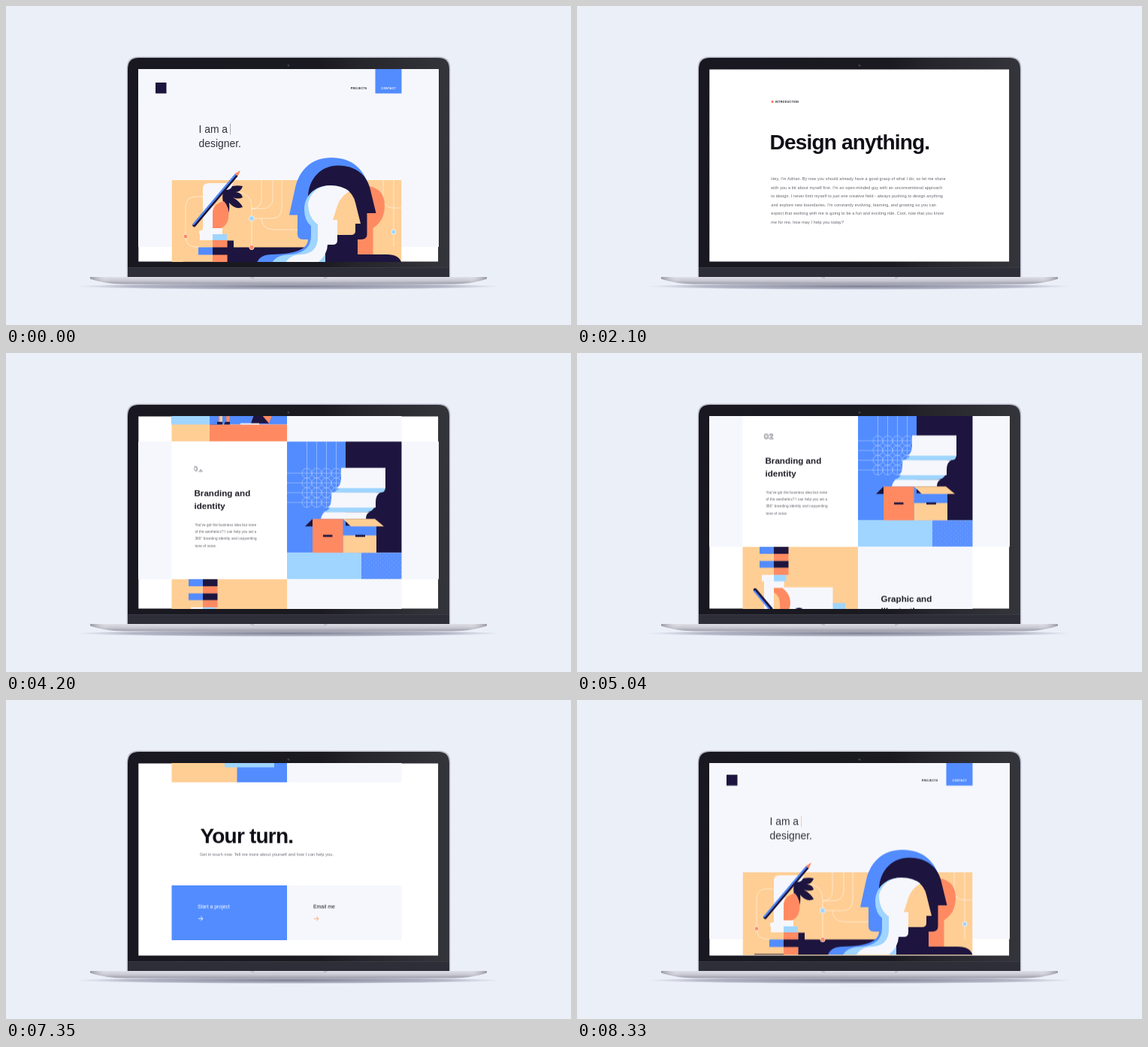
Animation of 752x425 px, one loop 8.4 s. Source, as an HTML page:

```html
<!DOCTYPE html>
<html lang="en">
<head>
<meta charset="utf-8">
<title>Portfolio on a laptop</title>
<style>
  html, body { margin: 0; width: 100%; height: 100%; overflow: hidden; background: #ebeff8; }
  svg { display: block; width: 100vw; height: 100vh; }
  text { font-family: "Liberation Sans", Arial, sans-serif; fill: #1d1c26; white-space: pre; }

  .blue { fill: #528cff } .navy { fill: #1d153f } .sky { fill: #9fd5ff }
  .coral { fill: #ff8a62 } .sand { fill: #ffce94 } .pale { fill: #f6f7fc }
  .line { fill: none; stroke: #fff; stroke-width: .7; opacity: .75 }

  .big { font-size: 28px; font-weight: 700; letter-spacing: -.8px; fill: #0f0f17 }
  .head { font-size: 11.6px; font-weight: 700 }
  .body { font-size: 5.4px; letter-spacing: .15px; fill: #62626c }
  .small { font-size: 4.65px; letter-spacing: .1px; fill: #62626c }
  .caps { font-size: 3.6px; font-weight: 700; letter-spacing: .31px }
  .hero { font-size: 13.9px; fill: #33323e }
  .link { font-size: 6.9px }
  .num { font: 700 9.6px Inter, sans-serif; letter-spacing: .2px; fill: none; stroke: #8d8d95; stroke-width: .75;
         stroke-dasharray: 34; animation: 8.4s linear infinite }

  #page { animation: scroll 8.4s cubic-bezier(.65,0,.35,1) infinite }
  @keyframes scroll {
    0%, 11.79% { transform: translateY(0) }
    22.5%, 27.74% { transform: translateY(-300px) }
    37.5%, 41.07% { transform: translateY(-540px) }
    50%, 55.95% { transform: translateY(-728.3px) }
    66.43%, 70.83% { transform: translateY(-916.6px) }
    81.55% { transform: translateY(-1103.4px) }
    87.5% { transform: translateY(-1103.4px); animation-timing-function: cubic-bezier(.6,0,.17,1) }
    100% { transform: translateY(0) }
  }
  #cursor { animation: blink 1.05s step-end infinite }
  @keyframes blink { 0% { stroke: #9a9aa4 } 45%, 100% { stroke: #ffbd82 } }
  .dot { transform-box: fill-box; transform-origin: center; stroke: #fff; stroke-width: .7;
         animation: pulse 1.05s ease-in-out infinite }
  @keyframes pulse { 50% { transform: scale(.75) } }

  #n1 { animation-name: draw1 } #n2 { animation-name: draw2 } #n3 { animation-name: draw3 }
  @keyframes draw1 { 0%, 34.5% { stroke-dashoffset: 34 } 44%, 100% { stroke-dashoffset: 0 } }
  @keyframes draw2 { 0%, 47% { stroke-dashoffset: 34 } 56%, 100% { stroke-dashoffset: 0 } }
  @keyframes draw3 { 0%, 62% { stroke-dashoffset: 34 } 70%, 100% { stroke-dashoffset: 0 } }

  #title { animation: title 8.4s linear infinite }
  @keyframes title { 0%, 77% { opacity: 0 } 82%, 100% { opacity: 1 } }
  #start { transform-origin: 0 247px; animation: unfold 8.4s linear infinite }
  @keyframes unfold { 0%, 83.1% { transform: scaleY(0) } 87.5%, 100% { transform: none } }
  #links { animation: links 8.4s ease-out infinite }
  @keyframes links {
    0%, 82% { opacity: 0; transform: translateY(10px) }
    86.5%, 100% { opacity: 1; transform: none }
  }
</style>
</head>
<body>
<svg viewBox="0 0 752 425" preserveAspectRatio="none">
  <defs>
    <clipPath id="screen"><rect x="176.3" y="84.4" width="398.8" height="256"/></clipPath>
    <clipPath id="art"><rect x="220.5" y="190" width="306" height="152"/></clipPath>
    <linearGradient id="bezel">
      <stop offset="0" stop-color="#191821"/><stop offset=".6" stop-color="#1a1a20"/>
      <stop offset=".72" stop-color="#25252b"/><stop offset="1" stop-color="#34343b"/>
    </linearGradient>
    <linearGradient id="base" x2="0" y2="1">
      <stop offset="0" stop-color="#dedee7"/><stop offset=".5" stop-color="#c9c9d3"/>
      <stop offset="1" stop-color="#9c9ca9"/>
    </linearGradient>
    <linearGradient id="edge">
      <stop offset="0" stop-color="#77778a" stop-opacity=".7"/><stop offset=".05" stop-color="#fff" stop-opacity="0"/>
      <stop offset=".95" stop-color="#fff" stop-opacity="0"/><stop offset="1" stop-color="#77778a" stop-opacity=".7"/>
    </linearGradient>
    <radialGradient id="shade">
      <stop offset="0" stop-color="#5b5d70" stop-opacity=".75"/><stop offset=".75" stop-color="#70728a" stop-opacity=".45"/>
      <stop offset="1" stop-color="#8a8ca0" stop-opacity="0"/>
    </radialGradient>
    <pattern id="stripes" width="6" height="6.2" y="197" patternUnits="userSpaceOnUse">
      <rect width="6" height="6.2" fill="#ffb184"/><rect width="6" height="3.1" fill="#1a1142"/>
    </pattern>
    <pattern id="specks" x="473" y="266" width="6" height="6" patternUnits="userSpaceOnUse">
      <rect width="6" height="6" fill="#5a90ff"/><circle cx="1.5" cy="1.5" r=".45" fill="#9fc6ff"/>
      <circle cx="4.5" cy="4.5" r=".45" fill="#9fc6ff"/>
    </pattern>
    <path id="arrow" d="M0 0H6M3.2-2.8 6 0 3.2 2.8" fill="none" stroke-width=".9"/>
    <path id="foot" d="M112 361H640V363.5Q622 370 594 370.6H158Q130 370 112 363.5Z"/>
  </defs>

  <rect width="752" height="425" fill="#ebeff8"/>

  <!-- laptop -->
  <ellipse cx="376" cy="373.5" rx="284" ry="4.6" fill="url(#shade)"/>
  <path d="M160.7 361V83Q160.7 67.6 176 67.6H576Q591.4 67.6 591.4 83V361Z" fill="#bdbecb"/>
  <path d="M162 361V84Q162 69 177 69H575Q590 69 590 84V361Z" fill="url(#bezel)"/>
  <rect x="162" y="348.5" width="428" height="12.5" fill="#2e2e38"/>
  <rect x="162" y="348.2" width="428" height=".8" fill="#3e3e49"/>
  <circle cx="376" cy="79.3" r="1.7" fill="#30313b"/><circle cx="376" cy="79.3" r=".7" fill="#4c5068"/>
  <use href="#foot" fill="url(#base)"/>
  <use href="#foot" fill="url(#edge)"/>
  <path d="M325 361H428Q427 364 423 364H330Q326 364 325 361Z" fill="#c3c3cf"/>
  <rect x="330" y="361" width="93" height="2.2" fill="#dcdce5"/>

  <g clip-path="url(#screen)">
    <rect x="176" y="84" width="400" height="257" fill="#fff"/>
    <g id="page">
      <!-- hero -->
      <g>
        <rect class="pale" x="176" y="60" width="400" height="261"/>
        <rect class="blue" x="491.5" y="60" width="35" height="56.5"/>
        <rect class="navy" x="199" y="102" width="14.5" height="14.5"/>
        <text class="caps" x="458.7" y="110.8">PROJECTS</text>
        <text class="caps" x="499.6" y="110.8" style="fill:#fff">CONTACT</text>
        <text class="hero" x="256.5" y="168.7">I am a</text>
        <text class="hero" x="256.5" y="187.7">designer.</text>
        <path id="cursor" d="M298.6 157V171.5" stroke-width=".8"/>

        <g clip-path="url(#art)">
          <rect class="sand" x="220.5" y="232" width="306" height="110"/>
          <path class="line" d="M239 307V268Q239 254 253 254H264M239 307Q239 321 253 321H258
            M308 247Q327 250 327 268V321M340 232V256Q340 270 327 270M327 283H353Q367 283 367 269V232
            M355 232V256Q355 270 341 270H327M340 283Q341 298 356 298H390M502 232V255Q502 269 516 269H527
            M516 232V301M516 301V321"/>
          <circle class="dot coral" cx="239" cy="307" r="2.9"/>
          <circle class="dot sky" cx="327" cy="283" r="3.4"/>
          <circle class="dot sky" cx="516" cy="301" r="3.1"/>

          <!-- raised hand -->
          <path class="navy" d="M289 262Q286 247 294 242Q304 238 315 240Q313 247 306 248Q314 249 315 255Q309 258 302 255
            Q312 261 315 268Q305 272 297 262Q298 270 296 276Z"/>
          <path class="pale" d="M262 243Q262 236 270 236H302Q301 245 293 245Q284 246 283 254Q275 262 275 278V296H288V304H257V300L262 298Z"/>
          <path class="coral" d="M275 296V274Q278 262 290 260Q298 268 296 283Q294 293 286 296Z"/>
          <rect class="pale" x="258" y="304" width="17" height="8"/><rect class="sky" x="275" y="304" width="19" height="8"/>
          <rect class="navy" x="236" y="340.8" width="290" height="1.2"/>
          <rect class="coral" x="275" y="312" width="19.5" height="30"/>
          <path class="navy" d="M275 321.5H294.5V312.5H303V321.5H406V342H294.5V331.5H275Z"/>
          <rect class="blue" x="256" y="321.5" width="19" height="10"/>
          <circle class="dot coral" cx="327" cy="321.5" r="3.2"/>
          <path d="M250.5 292 306.5 225.5" stroke="#1d153f" stroke-width="4.6" stroke-linecap="round"/>
          <path d="M249.5 291 305.5 224.5" stroke="#528cff" stroke-width="2.2" stroke-linecap="round"/>
          <path class="coral" d="M304.5 223.5 312 219 308.5 227Z"/>

          <!-- heads, back to front -->
          <path class="coral" d="M470 240H483Q504 244 504 266Q504 286 488.5 296V331H465Z"/>
          <path class="blue" d="M433 202C459 202 477 216 483 242L430 342H334Q338 331 354 331Q402 330 402 311H395Q388 311 388 304V278.5H377L385 242C391 216 409 202 433 202Z"/>
          <path class="navy" d="M442 212.5C464 212.5 480 224 484.5 243L492.5 276H480.5V304Q480.5 311 473 311H468V331H507Q523 331 526.5 342H414V300L402 254C403 229 420 212.5 442 212.5Z"/>
          <path class="sky" d="M431 239C411 239 397 253 397 271Q397 286 406 293V306Q406 328 380 331Q360 331 354 342H425V250Z"/>
          <path class="sand" d="M432 240Q460 240 465 262L472 290H465V300Q465 305 459 305H441L432 290Z"/>
          <path class="pale" d="M432 239Q447 239 457 247Q445 254 441 266L435 285H441V312Q441 318 435 318H428Q428 331 415 342H372Q378 331 394 331Q415 329 415 308V291Q402 282 402 262Q408 240 432 239Z"/>
        </g>
      </g>

      <!-- introduction -->
      <g transform="translate(0 300)">
        <circle cx="260" cy="127.6" r="1.5" fill="#ff6a56"/>
        <text class="caps" x="264" y="128.9">INTRODUCTION</text>
        <text class="big" x="256.5" y="191.3">Design anything.</text>
        <text class="body" data-x="258.3" data-y="232" data-step="11.6">Hey, I'm Adrian. By now you should already have a good grasp of what I do; so let me share|with you a bit about myself first. I'm an open-minded guy with an unconventional approach|to design. I never limit myself to just one creative field - always pushing to design anything|and explore new boundaries. I'm constantly evolving, learning, and growing so you can|expect that working with me is going to be a fun and exciting ride. Cool, now that you know|me for me, how may I help you today?</text>
      </g>

      <!-- web design -->
      <g transform="translate(0 540)">
        <rect class="blue" x="220.5" y="123" width="153.5" height="160.5"/>
        <path class="sky" d="M220.5 123H297V196H271V283.5H220.5Z"/>
        <rect class="sand" x="220.5" y="283.5" width="50.5" height="22.8"/>
        <rect class="coral" x="271" y="283.5" width="103" height="22.8"/>
        <path class="line" d="M262.5 123V257H344.5V147H220.5M220.5 169.5H344.5M220.5 209.5H344.5M220.5 225.5H344.5M308.5 147V170"/>
        <rect class="pale" x="288" y="149" width="19" height="18.5"/><path class="sky" d="M297 149H307V167.5H297Z" opacity=".45"/>
        <rect class="sky" x="311" y="149" width="31.5" height="32"/>
        <rect class="pale" x="248" y="212" width="12" height="11.5"/>
        <rect class="sky" x="330.5" y="212" width="12" height="11.5"/>
        <rect class="pale" x="279" y="174" width="38.5" height="34.5"/>
        <rect class="pale" x="264.5" y="235.5" width="16" height="18.5"/>
        <path class="coral" d="M287 184H297V192L295 196H288ZM283 254H288V280H283ZM292 254H298.5L297.5 280H293.5Z"/>
        <path class="sand" d="M284.5 254H288V280H284.5Z"/>
        <path class="navy" d="M285 186H293V191Q290 196 287 193ZM282 233H300.5V256H281Z"/>
        <path class="blue" d="M283 187Q283 179 291 179Q297 179 299 184L293 187ZM281 233H288V250L281 256Z"/>
        <path d="M281 197Q290 194 299 197L305 207 317 201 319 205 306 216 300 211V234H280V217L277 236H271.5Q271 212 274 203Q276 198 281 197Z" fill="url(#stripes)"/>
        <path class="coral" d="M313 203 318 199 320 204 316 207ZM272 235H276V239H272Z"/>
        <path class="navy" d="M280 280H288V283.5H271ZM292 280H298V283.5H290Z"/>
        <path class="blue" d="M271 283.5Q273 281 281 280V283.5Z"/>
        <path class="coral" d="M333 262H357.5L350 282H326Z"/>
        <path class="navy" d="M333 262 350 282H326Z"/>
        <rect class="pale" x="312" y="281.8" width="25" height="1.7"/>

        <rect class="pale" x="374" y="123" width="152.5" height="183.3"/>
        <text class="num" id="n1" x="399.6" y="160.4">01</text>
        <text class="head" data-x="401" data-y="194.2" data-step="17">UI/UX and web|design</text>
        <text class="body" data-x="402.4" data-y="236" data-step="10.75">Leave it to me to realize your app or|website into an intuitive, functional,|and beautiful design - one that under-|stands your users' needs.</text>
      </g>

      <!-- branding -->
      <g transform="translate(0 728.3)">
        <rect class="pale" x="176" y="118" width="400" height="183.3"/>
        <rect x="220.5" y="118" width="153.5" height="183.3" fill="#fff"/>
        <text class="num" id="n2" x="248.8" y="157.4">02</text>
        <text class="head" data-x="250.5" data-y="190.8" data-step="16.6">Branding and|identity</text>
        <text class="small" data-x="251.4" data-y="231" data-step="9.1">You've got the business idea but none|of the aesthetics? I can help you set a|360° branding identity and copywriting|tone of voice.</text>

        <rect class="blue" x="374" y="118" width="78" height="148"/>
        <rect class="navy" x="452" y="118" width="74.5" height="148"/>
        <g id="rings" class="line" style="opacity:.5"/>
        <rect class="sky" x="374" y="266" width="99" height="35.3"/>
        <rect x="473" y="266" width="53.5" height="35.3" fill="url(#specks)"/>
        <path class="sky" d="M446 168H505V179Q505 186 498 186H434Q445 184 446 168Z"/>
        <path class="pale" d="M446 153H505V180H440Q446 176 446 168Z"/>
        <path class="sky" d="M433 186H492V199Q491 212 478 212H421Q433 210 433 198Z"/>
        <path class="pale" d="M434 186H498Q492 189 492 199V206H428Q433 203 433 196Z"/>
        <path class="pale" d="M424 212H484Q479 214 479 221H419Q420 215 424 212Z"/>
        <rect class="blue" x="448.5" y="230" width="44.5" height="14"/>
        <rect class="sand" x="448.5" y="243" width="44.5" height="23"/>
        <rect class="coral" x="408" y="221" width="40.5" height="45"/>
        <path class="navy" d="M408 221V231H398Z"/>
        <path class="sand" d="M448.5 221H491L503 231H459Z"/>
        <path class="navy" d="M422 242.3H434.5V245H422ZM465 242.3H478V245H465Z"/>
      </g>

      <!-- illustration -->
      <g transform="translate(0 916.6)">
        <rect class="sand" x="220.5" y="113" width="153.5" height="183.4"/>
        <rect class="blue" x="307.5" y="207.5" width="66.5" height="88.9"/>
        <rect class="sky" x="291" y="188" width="66" height="88.5"/>
        <rect class="pale" x="274.5" y="167" width="66" height="89.5"/>
        <path class="blue" d="M243 113H262V122.5H243ZM243 132H262V141H243Z"/>
        <path class="coral" d="M262 122.5H281.5V132H262ZM262 141H281.5V150.5H262Z"/>
        <path class="navy" d="M262 113H281.5V122.5H262ZM262 132H281.5V141H262Z"/>
        <path class="navy" d="M277 202Q284 206 288 197Q294 192 302 196Q301 203 293 206Q302 205 304 211Q299 216 291 212
          Q301 217 302 224Q291 229 284 217Q281 225 277 220Z"/>
        <path class="pale" d="M246 150.5H278V159H275.5V168H262V206L284 220 292 236 283 230H257Q249 230 249 221V159H246Z"/>
        <rect class="sky" x="262" y="150.5" width="16.5" height="8.5"/>
        <path class="coral" d="M262 168H273Q284 175 284 188Q284 199 274 205Q270 203 270 190Q270 178 262 174Z"/>
        <path class="sand" d="M262 212H268Q272 214 273 220H262Z"/>
        <path d="M237 170.5 291 235" stroke="#1d153f" stroke-width="4.6" stroke-linecap="round"/>
        <path d="M236.2 172.2 289.5 236" stroke="#528cff" stroke-width="2.2" stroke-linecap="round"/>
        <path class="sand" d="M288.5 236.5 293.5 233 298 243.5Z"/><path class="coral" d="M294.5 240.5 296.7 238.5 298 243.5Z"/>
        <path class="pale" d="M249 212 262 219H276L290 222 282 230H257Q249 230 249 221Z"/>

        <rect class="pale" x="374" y="113" width="152.5" height="183.4"/>
        <text class="num" id="n3" x="403.8" y="152.4">03</text>
        <text class="head" data-x="404.6" data-y="186.2" data-step="16.6">Graphic and|illustration</text>
        <text class="small" data-x="405.9" data-y="227.8" data-step="9.1">Print ad? Posters? Digital assets?|Children's book? Food menu? If you|need an illustration for anything -|anything at all - you call me, okay?</text>
      </g>

      <!-- contact -->
      <g transform="translate(0 1103.4)">
        <g id="title">
          <text class="big" x="258.5" y="190.6">Your turn.</text>
          <text class="body" x="258" y="207.9">Get in touch now. Tell me more about yourself and how I can help you.</text>
        </g>
        <rect class="pale" x="374" y="247" width="152.5" height="73"/>
        <rect class="blue" id="start" x="220.5" y="247" width="153.5" height="73"/>
        <g id="links">
          <text class="link" x="255" y="278" style="fill:#fff">Start a project</text>
          <text class="link" x="409" y="278">Email me</text>
          <use href="#arrow" x="256" y="291.3" stroke="#fff"/>
          <use href="#arrow" x="410" y="291.3" stroke="#ff9d5c"/>
        </g>
      </g>
    </g>
  </g>
</svg>
<script>
  const add = (parent, tag, attrs) => {
    const el = document.createElementNS('http://www.w3.org/2000/svg', tag);
    for (const key in attrs) el.setAttribute(key, attrs[key]);
    return parent.appendChild(el);
  };

  // Break multi-line text at the bars
  for (const block of document.querySelectorAll('text[data-step]')) {
    const { x, y, step } = block.dataset;
    const lines = block.textContent.split('|');
    block.textContent = '';
    lines.forEach((line, i) => {
      add(block, 'tspan', { x, y: +y + i * step }).textContent = line;
    });
  }

  const rings = document.getElementById('rings');
  for (let i = 0; i < 4; i++) {
    const x = 400.5 + 13 * i, y = 160 + 13 * i;
    add(rings, 'path', { d: `M${x} 118V206M374 ${y}H446` });
    for (let j = 0; j < 4; j++) add(rings, 'circle', { cx: x, cy: 160 + 13 * j, r: 6.5 });
  }
</script>
</body>
</html>
```
